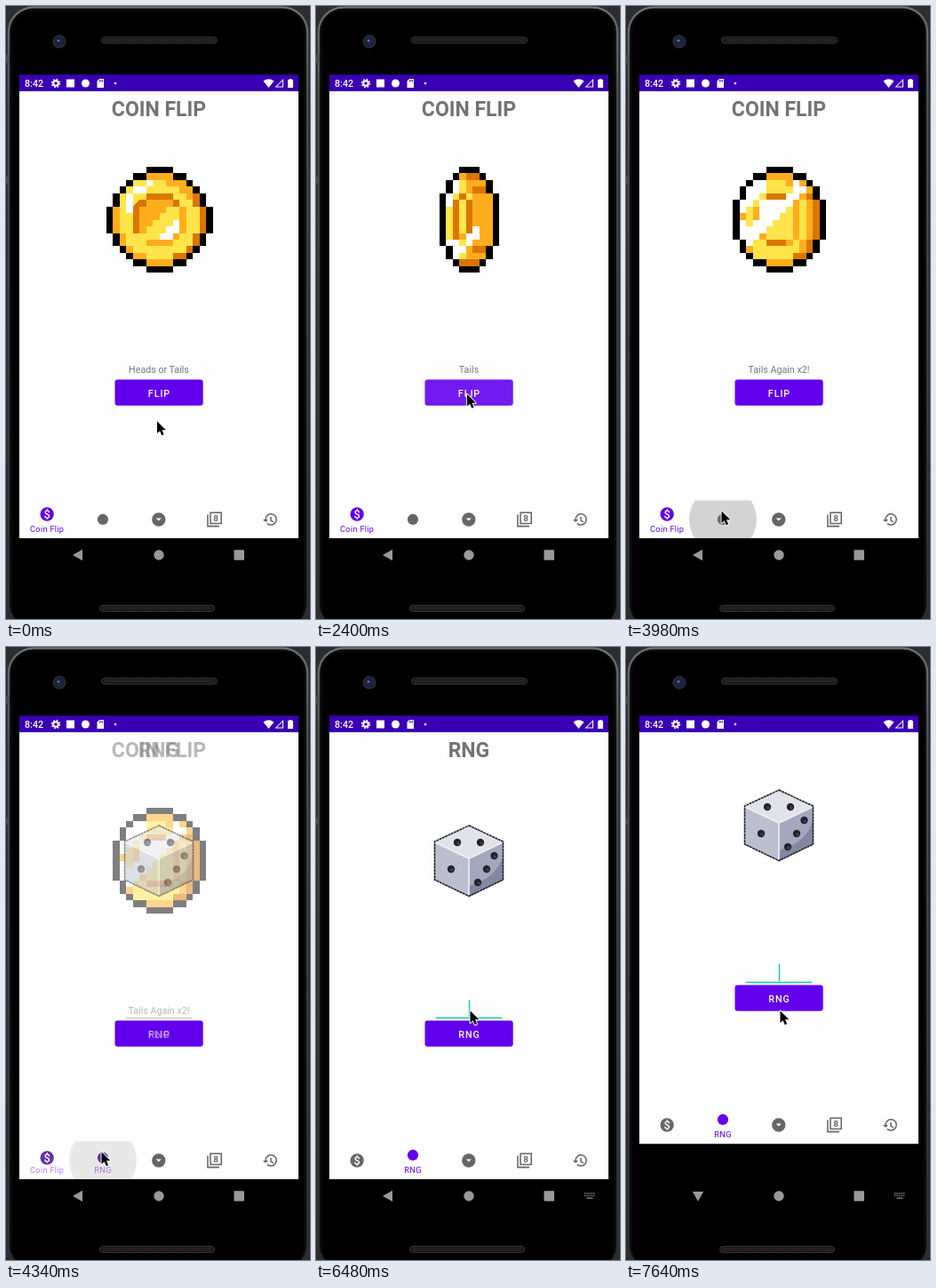
An HTML page for the animation above (8 s loop, 342 by 690 pixels).

```html
<!DOCTYPE html>
<html lang="en">
<head>
<meta charset="utf-8">
<title>Coin flip app</title>
<style>
  html, body { margin: 0; width: 100%; height: 100%; overflow: hidden; background: #000; }
  svg { display: block; width: 342px; height: 690px; font: 10.7px Roboto, sans-serif; text-anchor: middle; }
  .title { font-size: 23px; font-weight: 700; fill: #737373; }
  .button { font-weight: 500; letter-spacing: .95px; fill: #fff; }
  .label { font-size: 9.2px; letter-spacing: .3px; }
  #coins { filter: blur(.5px); }
</style>
</head>
<body>
<svg viewBox="0 0 342 690">
  <defs>
    <clipPath id="window"><path d="M15 95.5h314v503.7h-314z"/></clipPath>
    <clipPath id="tabBar"><path d="M15 556.4h314v42.8h-314z"/></clipPath>
    <clipPath id="rightFace"><path d="M172 238l39-19v43l-39 19z"/></clipPath>
    <linearGradient id="rim" x2="0" y2="1">
      <stop stop-color="#6c6e70"/>
      <stop offset=".15" stop-color="#4a4c4e"/>
      <stop offset="1" stop-color="#2c2d2e"/>
    </linearGradient>
  </defs>

  <!-- phone -->
  <path fill="#2b2d2e" d="M0 0h342v690h-342z"/>
  <rect x="3" y="1.5" width="336" height="700" rx="28" stroke="url(#rim)" stroke-width="2.5"/>
  <rect x="6" y="4.5" width="330" height="696" rx="25" stroke="#151515"/>
  <path fill="#494b4c" d="M0 55h3v9h-3zM0 192h3v8h-3z"/>
  <rect x="107.5" y="35" width="130" height="7" rx="3.5" fill="#191919" stroke="#353535"/>
  <rect x="105.5" y="674.5" width="129" height="7" rx="3.5" fill="#191919" stroke="#353535"/>
  <path stroke="#2c2c2c" stroke-width="3" stroke-dasharray="1 1" d="M111 38.5h123M109 678h122"/>
  <circle cx="60" cy="40" r="7" fill="#20242b" stroke="#34373b"/>
  <circle cx="60" cy="40" r="3.6" fill="#152552"/>
  <circle cx="59" cy="39" r="1.3" fill="#5f7fc4"/>

  <!-- app window -->
  <g clip-path="url(#window)">
    <g id="app">
      <path fill="#fefefe" d="M15 95h314v504.2h-314z"/>
      <g id="coinPage">
        <text class="title" x="172" y="124.3">COIN FLIP</text>
        <g id="coins"></g>
        <text id="result" x="172" y="413" fill="#757575"></text>
      </g>
      <g id="dicePage">
        <text class="title" x="172" y="124.3">RNG</text>
        <path fill="#e2e3e8" d="M172 201l39 18-39 19-39-19z"/>
        <path fill="#bcbfcd" d="M133 219l39 19v43l-39-19z"/>
        <path fill="#a5a8bd" d="M172 238l39-19v43l-39 19z"/>
        <path clip-path="url(#rightFace)" fill="#83879f" d="M211 228c-1 20-15 34-39 41v14h39z"/>
        <path fill="none" stroke="#eff0f4" stroke-width="1.6" d="M134 220l38 18 38-18M172 238v41"/>
        <path fill="none" stroke="#20222c" stroke-width="1.6" stroke-dasharray="3 .6" d="M172 201l38.5 18v43l-38.5 18.5-38.5-18.5v-43z"/>
        <g id="pips"></g>
        <path id="inputLine" d="M135 417.5h74"/>
        <path id="caret" stroke="#03cfbd" stroke-width="1.4" d="M172.5 397v19"/>
      </g>
      <rect x="122.5" y="420.4" width="99.2" height="29.4" rx="3" fill="#6200ee"/>
      <rect id="press" x="122.5" y="420.4" width="99.2" height="29.4" rx="3" fill="#fff"/>
      <text id="flipText" class="button" x="172.5" y="439.5">FLIP</text>
      <text id="rngText" class="button" x="172.5" y="439.5">RNG</text>
      <g clip-path="url(#tabBar)"><circle id="ripple" cx="109" cy="578"/></g>
      <g id="tabs"></g>
    </g>
  </g>

  <!-- status bar -->
  <path fill="#3900b3" d="M15 77.3h314v18.4h-314z"/>
  <g fill="#fff">
    <text x="31.5" y="90.8" font-weight="500">8:42</text>
    <circle cx="56" cy="87" r="2.8" fill="none" stroke="#fff" stroke-width="2"/>
    <circle cx="56" cy="87" r="4.4" fill="none" stroke="#fff" stroke-width="1.6" stroke-dasharray="1.73 1.73"/>
    <path d="M68 82.5h9v9h-9z"/>
    <circle cx="89.5" cy="87" r="4.5"/>
    <path d="M105 82h5v10h-7.5v-7.5z"/>
    <path stroke="#3900b3" stroke-width=".8" d="M105.5 83v2.5M107 83v2.5M108.5 83v2.5"/>
    <circle cx="123" cy="87" r="1.3"/>
    <path d="M289.5 84.5q6-4.5 12 0l-6 7.5z"/>
    <path d="M312 82v9.5h-9.5z"/>
    <path fill="#3900b3" d="M304.8 90.5l6.2-6.2v6.2z"/>
    <path d="M318.5 82h3v1h1.5v9h-6v-9h1.5z"/>
  </g>

  <!-- system buttons -->
  <g fill="#999">
    <path id="back" d="M75 618l11-6.2v12.4z"/>
    <circle cx="172" cy="618" r="5.7"/>
    <rect x="256.5" y="612.2" width="11.5" height="11.5" rx="1"/>
    <g id="keyboard" stroke="#8c8c8c" stroke-width="1.3">
      <path stroke-dasharray="1.3 1" d="M302 615h12M302 617.5h12"/>
      <path d="M304.5 620.3h7"/>
    </g>
  </g>

  <path id="cursor" stroke="#fff" stroke-width="1.8" stroke-linejoin="round" paint-order="stroke"
        d="M0 0V13.5L3.1 10.7 5.2 15.8 7.6 14.8 5.5 9.8H9.8Z"/>
</svg>

<script>
const LOOP = 8000;
const $ = id => document.getElementById(id);
const set = (id, attrs) => {
  for (const [name, value] of Object.entries(attrs)) $(id).setAttribute(name, value);
};

// Progress that advances in n jumps, the first at start and the last at end.
function steps(t, start, end, n) {
  if (t < start) return 0;
  if (t >= end) return 1;
  return (Math.floor((t - start) / (end - start) * (n - 1) + 1e-6) + 1) / n;
}
const easeOut = p => 1 - (1 - p) ** 1.75;
const mix = (a, b, p) => a + (b - a) * p;

// Coins on a 16-row grid: the upper rows' insets give the rim, paths give the shading.
const YELLOW = '#ffe54a', ORANGE = '#ffad1d', DARK = '#da7600', WHITE = '#fff';
const COINS = [
  { width: 16, insets: [6, 4, 3, 2, 1, 1, 0, 0], layers: [
    [ORANGE, 'M6 1h4v1h2v1h1v1h1v2h-1v-1h-1v-1h-1v-1h-2v-1h-3zM1 6h1v4h1v2h1v1h2v1h4v-1h2v-1h1v-2h1v-4h1v5h-1v2h-1v1h-2v1h-6v-1h-2v-1h-1v-2h-1z'],
    [DARK, 'M13 4h1v2h-1zM14 6h1v4h-1zM13 10h1v2h-1zM12 12h1v1h-1zM10 13h2v1h-2z'],
    [ORANGE, 'M6 5h4v1h2v4h-1v1h-1v1h-4v-1h-1v-6z'],
    [DARK, 'M6 4h4v1h-4zM5 5h1v1h-1v4h-1v-4zM10 5h1v1h-1z'],
    [YELLOW, 'M9 6h2v4h-1v1h-5v-1h1v-1h1v-1h1v-1h1z'],
    [WHITE, 'M6 2h1v1h-1zM4 3h2v1h-2zM3 4h1v3h-1zM10 8h1v2h-1v1h-2v-1h1v-1h1z'],
  ] },
  { width: 9, insets: [3, 2, 1, 1, 0, 0, 0, 0], layers: [
    [ORANGE, 'M3 1h3v1h1v2h1v8h-1v2h-1v1h-3v-1h1v-2h1v-8h-1v-2h-1z'],
    [DARK, 'M4 1h2v1h-2zM5 3h2v1h-2zM2 5h1v6h-1zM3 4h1v1h-1zM4 5h1v5h-1zM5 12h2v1h-2zM3 14h3v1h-3z'],
    [ORANGE, 'M3 10h1v1h-1z'],
    [WHITE, 'M2 2h1v2h-1v2h-1v-2h1zM5 9h1v2h-1v1h-1v1h-1v1h-1v-2h-1v-1h2v1h1v-2h1z'],
  ] },
  { width: 14, insets: [5, 3, 2, 1, 1, 0, 0, 0], layers: [
    [ORANGE, 'M5 1h4v1h2v1h1v2h1v6h-1v2h-1v1h-2v1h-4v-1h4v-1h1v-2h1v-6h-1v-2h-2v-1h-4z'],
    [DARK, 'M11 4h1v1h1v6h-1v2h-1v-2h1v-6h-1zM9 13h2v1h-2z'],
    [ORANGE, 'M1 4h1v4h-1zM2 12h1v1h-1zM5 4h4v1h1v6h-1v1h-4v-1h-1v-1h-1v-4h1v-1h1z'],
    [YELLOW, 'M5 5h4v6h-4z'],
    [DARK, 'M5 4h3v1h-3zM5 11h3v1h-3z'],
    [WHITE, 'M3 2h2v2h-1v1h-1v1h-1v1h-1v-2h1v-2h1zM9 2h1v1h1v1h-1v1h-2v-1h1zM4 5h5v1h-1v1h-1v1h-1v1h-1v1h-1v1h-1v1h-1v-1h-1v-3h1v1h1v-1h1z'],
  ] },
];

function gridRows({ width, insets }, inner) {
  let d = '';
  for (let row = inner; row < 16 - inner; row++) {
    const i = Math.min(row, 15 - row);
    const x = inner ? Math.max(insets[i] + 1, insets[i - 1]) : insets[i];
    const w = width - 2 * x;
    d += `M${x} ${row}h${w}v1h${-w}z`;
  }
  return d;
}
$('coins').innerHTML = COINS.map((coin, i) => {
  const body = gridRows(coin, 1);
  const layers = [[YELLOW, body], ...coin.layers, ['#000', gridRows(coin, 0) + body]];
  return `<g id="coin${i}" fill-rule="evenodd" shape-rendering="crispEdges" transform="translate(${172.5 - coin.width * 3.75} 181) scale(7.5 7.45)">` +
    layers.map(([fill, d]) => `<path fill="${fill}" d="${d}"/>`).join('') + '</g>';
}).join('');

$('pips').innerHTML = [[159, 220], [185, 220], [152, 250], [200.5, 235], [192, 250], [182, 265]]
  .map(([x, y]) => `<circle cx="${x}" cy="${y}" r="4.2" fill="#20222d"/><circle cx="${x + 1}" cy="${y + 1}" r="1.8" fill="#3d4052"/>`)
  .join('');

// Tab icons on a 24-unit grid.
const ICONS = [
  '<circle cx="12" cy="12" r="10"/><text x="12" y="18" fill="#fff" font-size="17" font-weight="500">$</text>',
  '<circle cx="12" cy="12" r="8"/>',
  '<path fill-rule="evenodd" d="M12 2a10 10 0 100 20 10 10 0 000-20zm0 12l-4-4h8z"/>',
  '<path fill="none" stroke="#666" stroke-width="2" d="M6 2h16v16h-16zM2 5v17h17"/><text x="14" y="14.8" font-size="13" font-weight="700">8</text>',
  '<path fill="none" stroke="#666" stroke-width="2" d="M5 13v-1a8 8 0 112.4 5.7M12.8 8v5.4l3.8 2.3"/><path d="M1 12h8l-4 4z"/>',
];
const LABELS = ['Coin Flip', 'RNG'];
$('tabs').innerHTML = ICONS.map((icon, i) => {
  const x = 46.2 + 62.8 * i;
  const label = LABELS[i] ? `<text id="label${i}" class="label" x="${x}" y="591.8" fill="#6200ee">${LABELS[i]}</text>` : '';
  return `<g id="tab${i}" fill="#666"><g transform="translate(${x - 9.2} 568.8) scale(.765)">${icon}</g></g>${label}`;
}).join('');

function showTab(i, active) {
  const rgb = [mix(102, 98, active), mix(102, 0, active), mix(102, 238, active)].map(Math.round);
  set('tab' + i, { transform: `translate(0 ${-6 * active})`, fill: `rgb(${rgb})` });
  set('label' + i, { opacity: active });
}

// Each move: start, end, jumps, destination x and y.
const MOVES = [
  [180, 430, 4, 171.5, 461],
  [700, 1050, 5, 174, 431.5],
  [1500, 1770, 4, 170, 437],
  [3010, 3540, 7, 107.5, 568.5],
  [4690, 5230, 7, 173.5, 409.5],
];
function cursorAt(t) {
  let x = 170, y = 467.5;
  for (const [start, end, n, toX, toY] of MOVES) {
    const p = easeOut(steps(t, start, end, n));
    x = mix(x, toX, p);
    y = mix(y, toY, p);
  }
  return `translate(${x} ${y})`;
}

function draw(t) {
  set('cursor', { transform: cursorAt(t) });

  const coin = t < 2400 ? 0 : t < 2480 ? 1 : 2;
  COINS.forEach((_, i) => set('coin' + i, { display: i === coin ? 'inline' : 'none' }));
  $('result').textContent = t < 2400 ? 'Heads or Tails' : t < 2570 ? 'Tails' : 'Tails Again x2!';
  set('press', { opacity: t < 1950 || t >= 2570 ? 0 : t < 2480 ? 0.1 : 0.05 });

  const page = steps(t, 4250, 4510, 4);
  for (const id of ['coinPage', 'flipText']) set(id, { opacity: 1 - page });
  for (const id of ['dicePage', 'rngText']) set(id, { opacity: page });
  showTab(0, 1 - page);
  showTab(1, page);
  set('ripple', { r: 38 * easeOut(steps(t, 3720, 3980, 4)), opacity: 0.17 * (1 - page) });

  const focused = t >= 5400;
  const caretOn = focused && !(t >= 5940 && t < 6480) && !(t >= 7010 && t < 7460);
  set('inputLine', { stroke: focused ? '#03cfbd' : '#858585', 'stroke-width': focused ? 1.6 : 1 });
  set('caret', { opacity: +caretOn });

  set('keyboard', { opacity: +(t >= 6480) });
  set('back', { transform: `rotate(${-90 * steps(t, 6570, 6650, 2)} 81 618)` });
  set('app', { transform: `translate(0 ${-40 * steps(t, 7460, 7640, 3)})` });
}

const began = performance.now();
function frame() {
  draw((performance.now() - began) % LOOP);
  requestAnimationFrame(frame);
}
frame();
</script>
</body>
</html>
```
